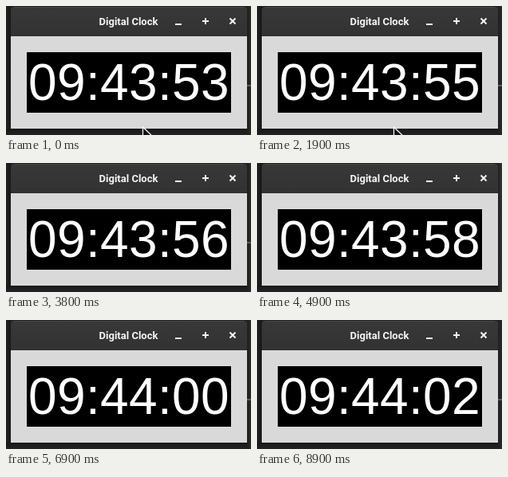
An HTML page with a canvas that plays this animation: 307x162 px, repeating every 9.3 s.

```html
<!DOCTYPE html>
<html lang="en">
<head>
<meta charset="utf-8">
<title>Digital Clock</title>
<style>
  html, body { margin: 0; width: 307px; height: 162px; overflow: hidden; background: #202020; }
  canvas { display: block; }
</style>
</head>
<body>
<canvas id="stage" width="307" height="162"></canvas>
<script>
const ctx = document.getElementById('stage').getContext('2d');
const LOOP = 9300;
const START = (9 * 60 + 43) * 60 + 53;

function rect(x, y, w, h, fill) {
  ctx.fillStyle = fill;
  ctx.fillRect(x, y, w, h);
}

function gradient(x0, y0, x1, y1, from, to) {
  const g = ctx.createLinearGradient(x0, y0, x1, y1);
  g.addColorStop(0, from);
  g.addColorStop(1, to);
  return g;
}

function line(x0, y0, x1, y1, width, color) {
  ctx.strokeStyle = color;
  ctx.lineWidth = width;
  ctx.beginPath();
  ctx.moveTo(x0, y0);
  ctx.lineTo(x1, y1);
  ctx.stroke();
}

// The desktop strip brightens while another window has focus.
function stripState(t) {
  if (t < 3800 || t >= 5900) return { color: '#292929', rule: true };
  if (t < 3900) return { color: '#2b2b2b', rule: true };
  if (t < 5500) return { color: '#343434', rule: false };
  return { color: '#2f2f2f', rule: false };
}

function drawDesktop(t) {
  rect(0, 0, 307, 162, '#202020');
  rect(0, 0, 6, 162, gradient(0, 0, 6, 0, '#222', '#181818'));
  rect(0, 154, 307, 8, gradient(0, 154, 0, 162, '#181818', '#232323'));
  const strip = stripState(t);
  rect(302, 0, 5, 162, gradient(302, 0, 307, 0, '#1f1f1f', strip.color));
  if (strip.rule) rect(302, 99, 5, 2, '#5c5c5c');
}

function drawWindow() {
  ctx.fillStyle = gradient(0, 1, 0, 38, '#383838', '#323232');
  ctx.beginPath();
  ctx.roundRect(6, 1, 296, 37, [4, 4, 0, 0]);
  ctx.fill();
  rect(10, 1, 288, 1, '#484848');
  rect(6, 38, 296, 116, '#d9d9d9');

  ctx.fillStyle = '#f4f4f4';
  ctx.font = 'bold 13px Roboto, "Open Sans", sans-serif';
  ctx.textAlign = 'center';
  ctx.fillText('Digital Clock', 153.5, 24);

  const ink = '#f2f2f2';
  rect(212, 22, 8, 2, ink);
  rect(246, 18, 8, 2, ink);
  rect(249, 15, 2, 8, ink);
  line(280.5, 15.5, 287.5, 22.5, 2, ink);
  line(287.5, 15.5, 280.5, 22.5, 2, ink);
}

function drawTime(t) {
  const seconds = START + Math.floor((t + 100) / 1000);
  const parts = [seconds / 3600, seconds / 60 % 60, seconds % 60];
  const text = parts.map(n => String(Math.floor(n)).padStart(2, '0')).join(':');

  rect(26, 58, 256, 76, '#000');
  ctx.fillStyle = '#fff';
  ctx.font = '64px "Liberation Sans", Arial, sans-serif';
  ctx.textAlign = 'left';
  let x = 28;
  for (const ch of text) {
    ctx.fillText(ch, x, 118);
    x += ch === ':' ? 18 : 36;
  }
}

function drawCursor() {
  ctx.beginPath();
  ctx.moveTo(171.5, 152);
  ctx.lineTo(171.5, 168);
  ctx.lineTo(187, 167);
  ctx.closePath();
  ctx.fillStyle = '#111';
  ctx.fill();
  ctx.lineWidth = 1.2;
  ctx.strokeStyle = '#fff';
  ctx.lineJoin = 'round';
  ctx.stroke();
}

function draw(t) {
  drawDesktop(t);
  drawWindow();
  drawTime(t);
  if (t < 3600) drawCursor();
}

const began = performance.now();
function frame() {
  draw((performance.now() - began) % LOOP);
  requestAnimationFrame(frame);
}
frame();
</script>
</body>
</html>
```
